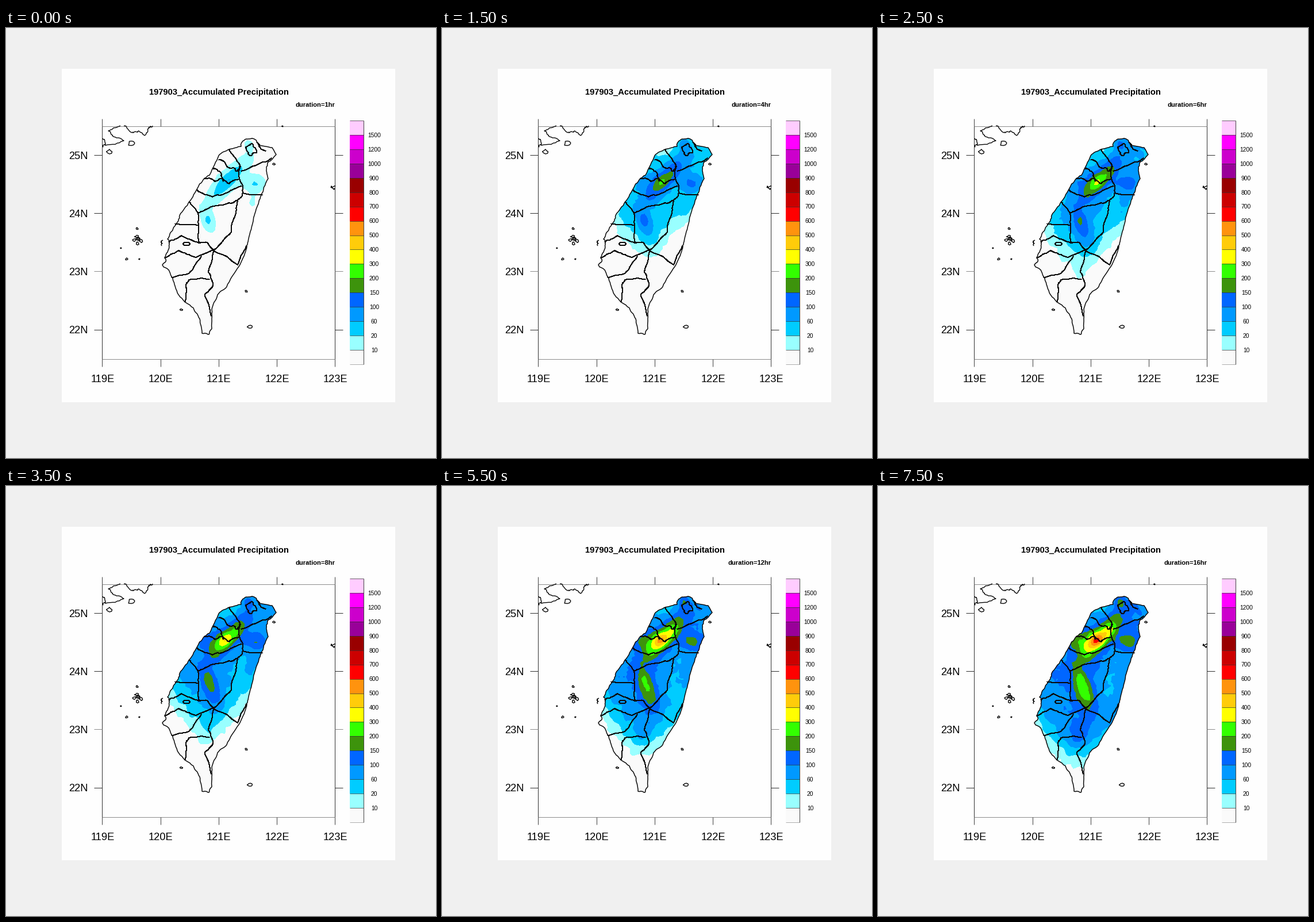
A matplotlib script that plays this animation: 748 by 748 pixels, repeating every 8000 ms.

```python
import numpy as np
import matplotlib.pyplot as plt
from matplotlib.animation import FuncAnimation
from matplotlib.patches import Polygon, Rectangle

SIZE, DPI = 748, 64
PT = 72 / DPI  # points per pixel
HOURS = 16
INK = "#0a0a0a"

COLORS = ["#fafafa", "#99ffff", "#00ccff", "#0099ff", "#0066ff", "#3d930c",
          "#33ff00", "#ffff00", "#ffcc0a", "#ff930e", "#ff0000", "#cc0000",
          "#990000", "#990099", "#cc00cc", "#ff00ff", "#ffccff"]
LEVELS = [10, 20, 60, *range(100, 201, 50), *range(300, 1001, 100), 1200, 1500]

COAST = [(427, 192), (435, 195), (440, 204), (463, 208), (470, 220), (456, 233),
         (453, 242), (456, 262), (445, 288), (436, 313), (430, 336), (421, 372),
         (417, 388), (405, 415), (384, 450), (368, 464), (358, 490), (358, 522),
         (353, 533), (341, 531), (337, 506), (326, 487), (303, 468), (293, 446),
         (284, 423), (272, 412), (278, 406), (276, 399), (281, 390), (284, 375),
         (281, 367), (286, 356), (298, 338), (302, 326), (318, 303), (334, 277),
         (345, 262), (354, 256), (370, 222), (388, 211), (409, 206), (411, 198),
         (418, 193), (427, 192)]

BORDERS = [
    [(360, 243), (372, 250), (378, 267)],
    [(370, 229), (390, 244), (402, 249), (408, 240)],
    [(388, 211), (407, 239), (405, 258), (412, 287), (446, 290)],
    [(409, 249), (432, 240), (462, 226)],
    [(417, 208), (428, 201), (436, 217), (425, 222), (417, 208)],
    [(437, 199), (443, 210), (452, 214)],
    [(345, 262), (366, 266), (375, 262), (385, 270), (405, 263)],
    [(332, 281), (358, 293), (372, 291), (410, 275)],
    [(334, 322), (356, 311), (388, 304), (402, 300), (412, 287)],
    [(403, 300), (399, 325), (392, 355), (362, 386)],
    [(319, 303), (334, 322), (336, 374), (350, 373), (362, 386)],
    [(294, 341), (334, 343)],
    [(283, 372), (305, 361), (336, 374)],
    [(277, 399), (300, 387), (330, 399), (362, 386)],
    [(288, 434), (318, 427), (340, 397)],
    [(362, 386), (352, 425), (360, 448), (346, 463), (357, 501)],
    [(311, 477), (313, 447), (318, 438), (354, 437)],
    [(362, 388), (403, 412), (418, 379)],
]
MAINLAND = [
    [(168, 192), (173, 204), (205, 196), (187, 189), (178, 179), (199, 170)],
    [(168, 206), (174, 203)],
    [(205, 170), (219, 182), (231, 179), (241, 187), (248, 175), (255, 170)],
    [(273, 369), (270, 373), (271, 379)],
    [(572, 275), (566, 276), (572, 279)],
]
# centre and radius
ISLETS = [(180, 215, 4), (218, 200, 5), (466, 237, 2), (481, 171, 1),
          (418, 458, 2), (425, 520, 4), (305, 490, 2), (228, 349, 2),
          (200, 383, 1), (210, 402, 2), (232, 402, 1)]

# Rain cells: centre, long and short radius, tilt, strength at first, growth
CELLS = [
    (386, 266, 40, 10, -48, 2.1, 1.1),   # northern ridge
    (379, 267, 10, 9, -48, .5, 2.8),     # its peak
    (401, 252, 7, 7, 0, 0, 1.0),
    (352, 272, 14, 12, 0, 0, 1.9),
    (432, 270, 15, 10, 0, 1.5, .3),
    (430, 305, 18, 8, 100, .8, -.8),
    (352, 335, 13, 8, 75, 1.6, -.2),     # central ridge
    (360, 362, 20, 11, 72, .4, 2.2),
    (406, 335, 35, 13, 105, 0, -1.1),    # dry eastern valley
    (421, 203, 6, 6, 0, 1.3, .3),
    (388, 213, 22, 9, -25, -1.0, -.2),   # dry north-west coast
    (350, 430, 18, 13, 90, 0, 1.3),
]

rng = np.random.default_rng(5)


def rough(pts, amp, passes=3):
    """Fractal line through pts."""
    pts = np.array(pts, float)
    for _ in range(passes):
        mid = (pts[1:] + pts[:-1]) / 2 + rng.normal(0, amp, (len(pts) - 1, 2))
        out = np.empty((len(pts) + len(mid), 2))
        out[::2], out[1::2] = pts, mid
        pts, amp = out, amp * .6
    return pts


def stroke(pts, width, color=INK, z=4, smooth=True):
    x, y = np.transpose(pts)
    ax.plot(x, y, color=color, lw=width * PT, zorder=z, antialiased=smooth,
            solid_capstyle="butt", solid_joinstyle="round")


def label(x, y, text, px, ha="center", weight="normal"):
    return ax.text(x, y, text, fontsize=px * PT, family="Liberation Sans",
                   ha=ha, va="baseline", weight=weight, color="black", zorder=5)


def ring(x, y, rx, ry, wobble=0):
    turn = np.linspace(0, 2 * np.pi, 9)
    r = 1 + rng.uniform(-wobble, wobble, 9)
    r[-1] = r[0]
    return np.column_stack([x + rx * r * np.cos(turn), y + ry * r * np.sin(turn)])


def rainfall(x, y, hour):
    """Rain in colour-band units: a front moving south plus growing cells."""
    s = np.log2(hour) / np.log2(HOURS)
    spine = 350 + 60 * (np.maximum(450 - y, 0) / 250) ** 2
    ahead = y + .012 * (x - spine) ** 2 - (348 + 120 * s ** 2)
    rain = (.5 + 3.4 * s ** .65) / (1 + np.exp(ahead / 20))
    for cx, cy, a, b, tilt, start, growth in CELLS:
        c, d = np.cos(np.radians(tilt)), np.sin(np.radians(tilt))
        u = ((x - cx) * c + (y - cy) * d) / a
        v = ((y - cy) * c - (x - cx) * d) / b
        rain = rain + (start + growth * s ** 2) * np.exp(-(u * u + v * v) / 2)
    return rain + grain * (.35 + .65 * s)


fig = plt.figure(figsize=(SIZE / DPI, SIZE / DPI), dpi=DPI, facecolor="#f0f0f0")
ax = fig.add_axes([0, 0, 1, 1])
ax.set_xlim(0, SIZE)
ax.set_ylim(SIZE, 0)
ax.axis("off")
ax.add_patch(Rectangle((97, 71), 580, 580, color="#fefefe", lw=0, zorder=0))

# Map frame, ticks and titles
L, R, T, B = 167.5, 572.5, 170.5, 575.5
for y in (T, B):
    stroke([(L, y), (R, y)], 1, "#8c8c8c")
for x in (L, R):
    stroke([(x, T), (x, B)], 1, "#303030")
for i in range(5):
    x = L + (R - L) * i / 4
    stroke([(x, T - 13), (x, T)], 1, "#404040")
    stroke([(x, B), (x, B + 13)], 1, "#404040")
    label(x + .3, 615.7, f"{119 + i}E", 18.2)
for i in range(4):
    y = 221 + 101.2 * i
    shade = "#8c8c8c" if i == 2 else "#303030"
    stroke([(L - 14, y), (L, y)], 1, shade)
    stroke([(R, y), (R + 14, y)], 1, shade)
    label(142.3, y + 6.5, f"{25 - i}N", 18.2, "right")
label(370, 116.2, "197903_Accumulated Precipitation", 14.78, weight="bold")
duration = label(572.6, 136.8, "", 11.08, "right", "bold")

# Colour key
KEY_X, KEY_W, STEP = 598, 24.5, 424 / len(COLORS)
for i, color in enumerate(COLORS):
    y = 585 - STEP * (i + 1)
    ax.add_patch(Rectangle((KEY_X, y), KEY_W, STEP, fc=color, lw=0, zorder=3))
    stroke([(KEY_X, y), (KEY_X + KEY_W, y)], .7, "#303030")
    if i < len(LEVELS):
        label(640.5, y + 3.8, str(LEVELS[i]), 10.3)
stroke([(KEY_X, 585), (KEY_X + KEY_W, 585)], .7, "#8c8c8c")
stroke([(KEY_X + KEY_W, 161), (KEY_X + KEY_W, 585)], .9, "#303030")

# Coasts and borders
coast = rough(COAST, .8)
land = ax.add_patch(Polygon(coast, fc=COLORS[0], ec="none", zorder=.5))
stroke(coast, 1.5)
for line in BORDERS:
    stroke(rough(line, 1.4), 1, smooth=False)
for line in MAINLAND:
    stroke(rough(line, 1.6), 1.4)
stroke(ring(314, 375.5, 6, 3), 1, smooth=False)
for x, y, r in ISLETS:
    stroke(ring(x, y, r, .8 * r, .4), 1.4)
for x, y in rng.normal((226, 366), (4, 3), (6, 2)):
    stroke(ring(x, y, 3, 2, .5), 1.4)

# One filled contour layer per hour
gx, gy = np.meshgrid(np.arange(264, 481, 4), np.arange(184, 545, 4))
noise = rng.normal(0, .3, gx.shape)
grain = sum(np.roll(noise, (i, j), (0, 1)) for i in range(3) for j in range(3)) / 6
layers = []
for hour in range(1, HOURS + 1):
    layer = ax.contourf(gx, gy, rainfall(gx, gy, hour), colors=COLORS,
                        levels=[-9, *range(1, 17), 30], zorder=1)
    layer.set_clip_path(land)
    layers.append(layer)


def update(k):
    for i, layer in enumerate(layers):
        layer.set_visible(i == k)
    duration.set_text(f"duration={k + 1}hr")
    return [*layers, duration]


update(0)
anim = FuncAnimation(fig, update, frames=HOURS, interval=500, repeat=True,
                     repeat_delay=0, blit=False)
plt.show()
```
